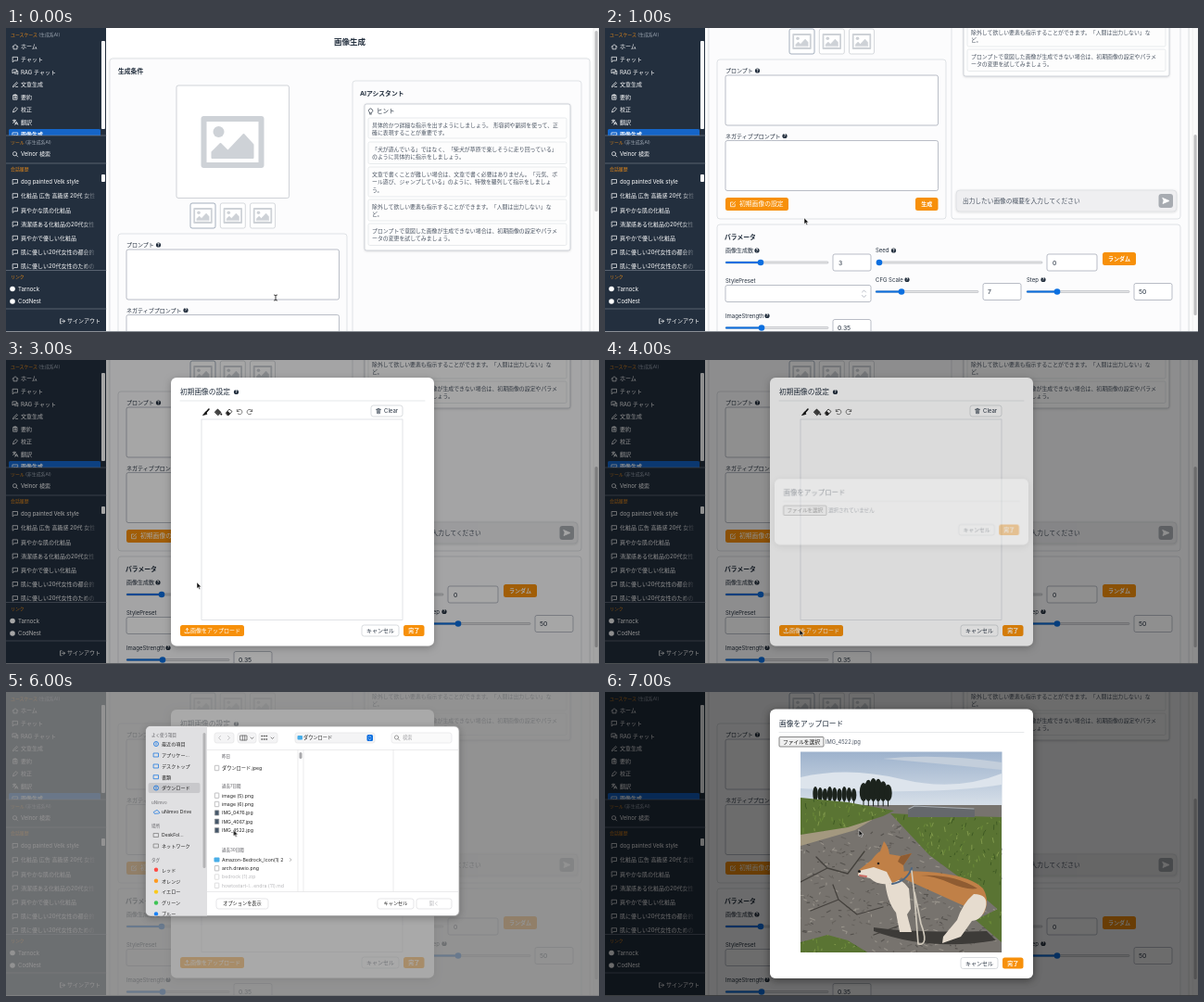
Recreate the animation shown at these times as an HTML page. Size 640 by 328 pixels, loop 8000 ms.

```html
<!DOCTYPE html>
<html lang="ja">
<head>
<meta charset="utf-8">
<title>画像生成</title>
<style>
html, body { margin: 0; width: 100%; height: 100%; overflow: hidden; background: #fff; }
svg { display: block; width: 640px; height: 328px; font-family: Inter, "Noto Sans CJK JP", "Noto Sans CJK", sans-serif; }
text { white-space: pre; }
.anim { animation: 8s step-end infinite; }
.page { animation-name: page; }
.thumb { animation-name: thumb; }
.hover { animation-name: hover; }
.modal { animation-name: modal; }
.dim { animation-name: dim; }
.upload { animation-name: upload; transform-origin: 320px 163.5px; }
.sheet { animation-name: sheet; }
.preview { animation-name: preview; }
.cursor { animation-name: cursor; }
.beam { animation-name: beam; }
.hand { animation-name: hover; }
.arrow { animation-name: arrow; }
@keyframes page { 0% { transform: none } 12.5%, 100% { transform: translateY(-188px) } }
@keyframes thumb { 0% { transform: none } 12.5%, 100% { transform: translateY(112px) } }
@keyframes hover { 0% { opacity: 0 } 25% { opacity: 1 } 37.5%, 100% { opacity: 0 } }
@keyframes modal { 0% { opacity: 0 } 37.5%, 100% { opacity: 1 } }
@keyframes dim { 0% { opacity: 0 } 50% { opacity: .4 } 62.5%, 100% { opacity: 1 } }
@keyframes upload {
  0% { opacity: 0; transform: scale(.965) }
  50% { opacity: .35; transform: scale(.965) }
  62.5% { opacity: 1; transform: none }
  87.5%, 100% { opacity: 0; transform: none }
}
@keyframes sheet { 0% { opacity: 0 } 75% { opacity: 1 } 87.5%, 100% { opacity: 0 } }
@keyframes preview { 0% { opacity: 0 } 87.5%, 100% { opacity: 1 } }
@keyframes cursor {
  0% { transform: translate(291px, 291px) }
  12.5% { transform: translate(215px, 205px) }
  25% { transform: translate(152px, 188px) }
  37.5% { transform: translate(206px, 240px) }
  50% { transform: translate(210px, 291px) }
  62.5% { transform: translate(226px, 164px) }
  75% { transform: translate(245.5px, 149px) }
  87.5%, 100% { transform: translate(274px, 149px) }
}
@keyframes beam { 0% { opacity: 1 } 12.5%, 100% { opacity: 0 } }
@keyframes arrow { 0% { opacity: 0 } 12.5% { opacity: 1 } 25% { opacity: 0 } 37.5%, 100% { opacity: 1 } }
</style>
</head>
<body>
<svg id="stage" viewBox="0 0 640 328"></svg>
<script>
const INK = '#232f3e', ORANGE = '#f7900a', LINE = '#c9cdd2', BLUE = '#0b6fe0';

// Text is placed by its vertical centre.
const t = (x, cy, s, { size = 6, fill = INK, weight = 400, anchor = 'start' } = {}) =>
  `<text x="${x}" y="${cy + size * .36}" font-size="${size}" fill="${fill}" font-weight="${weight}" text-anchor="${anchor}">${s}</text>`;
const box = (x, y, w, h, fill = '#fff', stroke = 'none', r = 2, extra = '') =>
  `<rect x="${x}" y="${y}" width="${w}" height="${h}" rx="${r}" fill="${fill}" stroke="${stroke}" stroke-width=".7" ${extra}/>`;
const path = (d, stroke, w = .7, fill = 'none') =>
  `<path d="${d}" fill="${fill}" stroke="${stroke}" stroke-width="${w}" stroke-linecap="round" stroke-linejoin="round"/>`;
const shape = (d, fill) => `<path d="${d}" fill="${fill}"/>`;
const dot = (x, y, r, fill) => `<circle cx="${x}" cy="${y}" r="${r}" fill="${fill}"/>`;
const at = (x, y, s) => `<g transform="translate(${x} ${y})">${s}</g>`;
const anim = (name, s) => `<g class="anim ${name}">${s}</g>`;
const clipped = (id, s) => `<g clip-path="url(#${id})">${s}</g>`;
const btn = (x, y, w, h, label, fill = ORANGE, ink = '#fff', stroke = 'none') =>
  box(x, y, w, h, fill, stroke, 2.5) +
  t(x + w / 2, y + h / 2, label, { fill: ink, weight: ink === '#fff' ? 600 : 400, anchor: 'middle' });
const help = (x, y) => dot(x, y, 2.6, INK) + t(x, y, '?', { size: 4.4, fill: '#fff', weight: 700, anchor: 'middle' });

// Icons live in a 6 x 6 box.
const ICONS = {
  home: 'M0 3L3 .5 6 3M1 2.5V5.5H5V2.5',
  chat: 'M.5 .5H5.5V4.3H2L.5 5.7Z',
  chats: 'M.3 .5H4.3V3.3H1.5L.3 4.3ZM4.5 2H5.8V5.7L4.8 4.8H2.2V3.5',
  pen: 'M.5 5.5L1 4 4.5 .5 5.5 1.5 2 5ZM3.5 5.5H5.7',
  clip: 'M1 1H5V5.7H1ZM2 .4H4V1.5H2ZM2 3H4M2 4.3H4',
  nib: 'M.5 5.5L1.5 2.5 4 .5 5.5 2 3.5 4.5Z',
  lang: 'M.3 1.2H3.7M2 .3V1.2M3.2 1.2L.5 4M1 2L3 3.8M2.8 5.7L4.3 2.5 5.8 5.7M3.3 4.6H5.3',
  image: 'M.3 .8H5.7V5.3H.3ZM.5 4.8L2.3 2.8 3.5 4 4.5 3 5.6 4.3',
  search: 'M4.2 4.2L5.7 5.7M4.6 2.5A2.1 2.1 0 1 1 .4 2.5A2.1 2.1 0 1 1 4.6 2.5',
  exit: 'M2 .5H.5V5.5H2M2 3H5.5M4 1.5L5.5 3 4 4.5',
  edit: 'M3 1H.5V5.7H5.2V3M2.2 4L5.5 .5',
  up: 'M3 4V.5M1.5 2L3 .5 4.5 2M.5 4.5V5.5H5.5V4.5',
  trash: 'M.5 1.3H5.5M2 1.2V.4H4V1.2M1.2 1.5L1.5 5.7H4.5L4.8 1.5M2.5 2.5V4.7M3.5 2.5V4.7',
  bulb: 'M2 4.2A2.2 2.2 0 1 1 4 4.2V5H2ZM2.2 6H3.8',
  undo: 'M.3 .5V2.5H2.3M.5 2.4A2.7 2.7 0 1 1 1.3 5',
  redo: 'M5.7 .5V2.5H3.7M5.5 2.4A2.7 2.7 0 1 0 4.7 5'
};
const icon = (name, cx, cy, color = '#fff', w = .7) => at(cx - 3, cy - 3, path(ICONS[name], color, w));

const picture = (cx, cy, k) => `<g transform="translate(${cx} ${cy}) scale(${k})">` +
  path('M-31 -25H31V25H-31Z', '#ced2d7', 6) + dot(-15, -11, 6, '#ced2d7') +
  path('M-22 17V11L-13 2 -5 10 12 -8 22 3V17Z', '#ced2d7', 2, '#ced2d7') + '</g>';

const slider = (x0, x1, x, y) =>
  box(x0, y - 1, x1 - x0, 2, '#e6e6e8', '#b9bcc0', 1) + box(x0, y - 1, x - x0, 2, BLUE, 'none', 1) + dot(x, y, 3.3, BLUE);
const field = (x, y, w, value, dx = 6) => box(x, y, w, 18, '#fff', '#9ca3af') + t(x + dx, y + 9.2, value, { size: 6.8 });

function sidebar() {
  const head = (y, a, b = '') => t(5, y, `${a}<tspan fill="#9aa3af"> ${b}</tspan>`, { size: 4.9, fill: '#dd8419' });
  const item = (ic, y, s, weight = 400) => icon(ic, 10, y) + t(16, y, s, { fill: '#fff', weight });
  const cases = [['home', 'ホーム'], ['chat', 'チャット'], ['chats', 'RAG チャット'], ['pen', '文章生成'],
    ['clip', '要約'], ['nib', '校正'], ['lang', '翻訳'], ['image', '画像生成']];
  const chats = ['dog painted Velk style', '化粧品 広告 高級感 20代 女性', '爽やかな肌の化粧品', '清潔感ある化粧品の20代女性',
    '爽やかで優しい化粧品', '肌に優しい20代女性の都会的', '肌に優しい20代女性のための'];
  return box(0, 0, 108, 328, INK, 'none', 0) +
    head(7, 'ユースケース', '(生成系AI)') +
    clipped('cases', box(3, 109, 99, 14, '#1565c8', 'none', 1.5) +
      cases.map(([ic, s], i) => item(ic, 20.3 + i * 13.55, s, i === 7 ? 700 : 400)).join('')) +
    box(103, 14, 4, 95, '#fff', 'none', 1) +
    head(123, 'ツール', '(非生成系AI)') + item('search', 136.2, 'Velnor 検索') +
    head(152.5, '会話履歴') +
    clipped('chats', chats.map((s, i) => item('chat', 166 + i * 15.2, s)).join('') +
      '<rect x="82" y="158" width="26" height="104" fill="url(#fade)"/>') +
    box(103, 158, 4, 8, '#fff', 'none', 1) +
    head(267.8, 'リンク') + dot(7, 281.5, 2.8, '#fff') + t(13, 281.5, 'Tarnock', { fill: '#fff' }) +
    dot(7, 295, 2.8, '#fff') + t(13, 295, 'CodNest', { fill: '#fff' }) +
    icon('exit', 61, 316.3) + t(66, 316.3, 'サインアウト', { fill: '#fff' }) +
    [116, 146, 261.5, 303].map(y => path(`M0 ${y}H108`, '#7c8592', .6)).join('');
}

function hints() {
  const list = [
    [97, 22, '具体的かつ詳細な指示を出すようにしましょう。 形容詞や副詞を使って、正', '確に表現することが重要です。'],
    [123, 23.5, '「犬が遊んでいる」ではなく、「柴犬が草原で楽しそうに走り回っている」', 'のように具体的に指示をしましょう。'],
    [150, 32, '文章で書くことが難しい場合は、文章で書く必要はありません。「元気、ボ', 'ール遊び、ジャンプしている」のように、特徴を羅列して指示をしましょ', 'う。'],
    [185, 23, '除外して欲しい要素も指示することができます。「人間は出力しない」な', 'ど。'],
    [211, 23.5, 'プロンプトで意図した画像が生成できない場合は、初期画像の設定やパラメ', 'ータの変更を試してみましょう。']];
  return box(387, 82, 222, 158, '#fff', '#b8bec6', 2, 'filter="url(#soft)"') +
    icon('bulb', 393.5, 90, INK) + t(400, 90, 'ヒント', { size: 6.5 }) +
    list.map(([y, h, ...lines]) => box(391, y, 214, h, '#fdfdfd', '#dfe2e6', 1.5) +
      lines.map((s, i) => t(395, y + 7.5 + i * 8.6, s, { size: 5.9, fill: '#4b5563' })).join('')).join('');
}

function page() {
  const bold = { size: 6.8, weight: 700 };
  const card = (x, y, w, h) => box(x, y, w, h, '#fcfcfd', '#d3d7dc', 3);
  const init = fill => btn(130, 371, 68, 14, '', fill) + icon('edit', 138, 378) +
    t(145, 378, '初期画像の設定', { size: 6.8, fill: '#fff' });
  return t(371, 15, '画像生成', { size: 8.5, weight: 600, anchor: 'middle' }) +
    box(112, 33, 518, 520, '#fcfcfd', '#d3d7dc', 3, 'filter="url(#soft)"') + t(121, 46.5, '生成条件', bold) +
    box(184, 62, 121.5, 121.5, '#fff', '#bcc1c8') + picture(244.5, 123, 1) +
    [199, 231.3, 263.5].map((x, i) => box(x, 189, 27, 27, '#fff', i ? '#c4c9cf' : '#7f8fa3') + picture(x + 13.5, 202.5, .3)).join('') +
    card(121, 222, 247, 172) +
    t(130, 234, 'プロンプト') + help(164.5, 234) + box(130, 239, 229.5, 54, '#fff', '#9ca3af') +
    t(130, 304.5, 'ネガティブプロンプト') + help(194, 304.5) + box(130, 309.5, 229.5, 54, '#fff', '#9ca3af') +
    init(ORANGE) + anim('hover', init('#b9691a')) + btn(335, 371, 24.5, 14, '生成') +
    card(374, 57, 247, 337) + t(382, 71, 'AIアシスタント', bold) + hints() +
    box(379, 363, 238, 23, '#efeff1', '#d9dbdf', 4, 'filter="url(#soft)"') +
    t(386, 374.5, '出力したい画像の概要を入力してください', { size: 6.7, fill: '#4b5563' }) +
    box(597.5, 367, 15.5, 15, '#a7abb1', 'none', 3) + path('M602 371.5L609 374.5 602 377.5 603 374.5Z', '#fff', .8, '#fff') +
    card(121, 400, 500, 140) + t(129, 413.5, 'パラメータ', bold) +
    t(130, 428, '画像生成数') + help(164, 428) + slider(130, 241, 168, 441) + field(246, 432, 41, '3') +
    t(292, 428, 'Seed') + help(311.5, 428) + slider(293, 472, 296, 441) + field(477, 432, 54, '0') +
    btn(537, 430, 36, 14, 'ランダム') +
    t(130, 460.5, 'StylePreset') + box(130, 465.5, 157, 18, '#fff', '#9ca3af') +
    path('M277.5 473L279.5 471 281.5 473M277.5 476.5L279.5 478.5 281.5 476.5', '#9ca3af') +
    t(292, 459.5, 'CFG Scale') + help(326, 459.5) + slider(292, 403, 320, 472.5) + field(408, 463.5, 41, '7', 5) +
    t(455, 459.5, 'Step') + help(473, 459.5) + slider(455, 566, 488, 472.5) + field(571, 463.5, 41, '50', 5) +
    t(130, 498.5, 'ImageStrength') + help(175, 498.5) + slider(130, 241, 169, 511.5) + field(246, 502.5, 41, '0.35', 5);
}

const panel = (y, h) => box(178, y, 284, h, '#fff', 'none', 6, 'filter="url(#lift)"');
const footer = y => btn(384, y, 40, 12, 'キャンセル', '#fff', INK, LINE) + btn(429, y, 22.5, 12, '完了');
const rule = y => path(`M188 ${y}H452`, '#d5d8dc', .6);

function settings() {
  return panel(19, 289.5) + t(188, 34.5, '初期画像の設定', { size: 7.7 }) + help(248.5, 34.5) + rule(44) +
    path('M219 53L215.5 57', '#111', 1.6) + path('M215.5 56L212.5 59.5 216.5 58.5Z', '#111', .8, '#111') +
    path('M225.5 56L228.5 53 232 56.5 229 59.5Z', '#111', .8, '#444') + dot(232.3, 58.5, 1, '#111') +
    path('M237.5 57L241 53 244 55.5 240.5 59.5H239Z', '#222', .8) + shape('M237.5 57L239.2 55 242 57.6 240.5 59.5H239Z', '#222') +
    icon('undo', 252, 56, '#444') + icon('redo', 263, 56, '#444') +
    btn(394, 49, 34, 12, '', '#fff', INK, LINE) + icon('trash', 402, 55, INK, .6) + t(408, 55, 'Clear') +
    box(211, 64, 217, 216.5, '#fff', '#d5d8dc', 0) +
    btn(188, 286, 69, 12, '') + icon('up', 195.5, 292) + t(199, 292, '画像をアップロード', { fill: '#fff', weight: 500 }) + footer(286);
}

// Title and file row shared by the upload dialog's two sizes.
const uploadHead = (y, file) => t(188, y + 15.5, '画像をアップロード', { size: 7.7 }) + rule(y + 25) +
  box(188, y + 30, 48, 10.5, '#efefef', '#555', 1) + t(212, y + 35.2, 'ファイルを選択', { size: 5.7, fill: '#111', anchor: 'middle' }) +
  t(238, y + 35.2, file, { size: 5.8, fill: '#4b5563' });

let seed = 7;
const rnd = (a, b) => a + (b - a) * ((seed = seed * 16807 % 2147483647) / 2147483647);
// Short random strokes over an area, for grass and gravel.
const scatter = (n, [x0, y0, x1, y1], dx, dy, colors, w) => colors.map(c => path(Array.from({ length: n }, () =>
  `M${rnd(x0, x1).toFixed(1)} ${rnd(y0, y1).toFixed(1)}l${rnd(-dx, dx).toFixed(1)} ${rnd(-dy, dy).toFixed(1)}`).join(''), c, w)).join('');

const GRASS = 'M211 114L262 119 312 128 300 134 262 146 211 154ZM308 131L350 133 428 135V238L392 207 350 176ZM211 270L240 262 262 268 285 282H211ZM400 246L428 232V270Z';

function photo() {
  const fur = '#c08047', pale = '#e6dccf', dark = '#8f5c32';
  const tree = (x, top, r) => `<ellipse cx="${x}" cy="${(top + 118) / 2}" rx="${r}" ry="${(118 - top) / 2}" fill="#1c231d"/>` + path(`M${x} 116V123`, '#1c231d', 1);
  const row = Array.from({ length: 9 }, (_, i) => tree(227 + i * 5.2, 102 + i % 3, 2.7)).join('');
  const grove = Array.from({ length: 6 }, (_, i) => tree(279 + i * 5.3, 98 - Math.sin(i * .7) * 5, 4.2)).join('');
  return clipped('photo', '<rect x="211" y="64" width="218" height="218" fill="url(#sky)"/>' +
    shape('M211 92Q262 80 320 94T428 88V100Q350 112 211 104Z', '#dde4ec') + shape('M300 72Q360 66 428 76V84Q370 78 300 72Z', '#c3cedb') +
    shape('M211 122H428V282H211Z', '#77736e') +
    scatter(170, [211, 140, 428, 282], 5, 2, ['#55524e', '#98938b', '#67635e'], 1.1) +
    path('M211 205L240 190 262 196 280 172M240 190L228 178M222 236L252 224 272 240 300 232M252 224L246 208M290 262L318 252 348 270 402 262', '#44413d', 1.3) +
    shape('M211 152L262 144 295 134 270 149 211 166Z', '#a3987f') +
    row + grove +
    shape(GRASS, '#5a7433') +
    clipped('grass', scatter(230, [211, 114, 428, 282], 1.5, 5, ['#3f5a24', '#80994b', '#6b8a38'], 1)) +
    shape('M327 126L334 122 399 126V135H327Z', '#65686c') + path('M328 126L334 123 398 126', '#a9adb1', 1.2) +
    shape('M290 254Q330 260 412 258L422 268Q350 280 290 258Z', '#3d3b38') +
    shape('M306 194Q340 192 366 196 396 200 408 212 416 226 408 240 398 246L387 262 366 271 363 264 376 249 340 240 328 246 326 262H314L317 238Q304 222 306 194Z', fur) +
    shape('M340 198Q376 196 402 212 390 214 372 206T340 198Z', dark) +
    shape('M302 202Q318 198 328 212L330 234 326 240 331 259H318L314 238Q304 226 302 202Z', pale) +
    shape('M398 218Q414 218 411 232 407 246 396 247L384 264 364 271 365 264 380 246Q386 228 398 218Z', pale) +
    shape('M288 181Q293 174 297 172L301 161Q306 167 307 175L319 177 331 174 322 187Q325 202 310 206 294 208 286 200L273 197 274 192Z', fur) +
    shape('M319 177L331 174 322 187 316 183Z', dark) +
    shape('M274 193L290 189 304 194 310 206Q296 210 286 201L273 198Z', pale) +
    dot(274.5, 193.5, 1.6, '#222') + dot(295, 185, 1.3, '#222') + path('M275 198L282 199', '#c96a62', 1.8) +
    path('M310 207Q326 204 331 190', '#4c6784', 2) + path('M331 193L334 220 338 272Q350 274 341 250L334 216', '#d0c9bc', 1.7));
}

function fileSheet() {
  const small = { size: 4.5, fill: '#8a8a8e', weight: 600 };
  const side = [[56, '最近の項目'], [68, 'アプリケー…'], [80, 'デスクトップ'], [91.7, '書類'], [103.5, 'ダウンロード'],
    [129, 'uNimvo Drive'], [154.5, 'DeskFol…'], [166, 'ネットワーク']];
  const tags = [['レッド', '#ff4b45'], ['オレンジ', '#ff9a1f'], ['イエロー', '#fbc91b'], ['グリーン', '#3ec455'], ['ブルー', '#1a82f7']];
  const files = [[82, 'ダウンロード.jpeg'], [111.7, 'image (5).png'], [121, 'image (6).png'], [130.4, 'IMG_0476.jpg'], [139.8, 'IMG_4067.jpg'],
    [149.2, 'IMG_4522.jpg'], [181, 'Amazon-Bedrock_Icon(1) 2'], [190.2, 'arch.drawio.png'], [199.5, 'bedrock (1).zip'], [208.8, 'howtostart-l...endra (11).md']];
  const sideIcon = (y, i) => i === 5 ? path(`M160 ${y + 2}Q158 ${y} 161 ${y - .5}Q163 ${y - 3} 165 ${y}Q167 ${y + 2} 165 ${y + 2}Z`, BLUE)
    : i > 5 ? path(`M159.5 ${y - 2}H164.5V${y + 2}H159.5Z`, '#777')
    : i === 0 || i === 4 ? `<circle cx="162" cy="${y}" r="2.5" fill="none" stroke="${BLUE}" stroke-width=".8"/>` + path(`M162 ${y - 1.2}V${y + 1}`, BLUE)
    : path(`M159.5 ${y - 2}H164.5V${y + 2}H159.5Z`, BLUE);
  const fileIcon = (y, i) => i === 6 ? box(224.5, y - 2.5, 6, 5, '#49aee8', 'none', 1)
    : box(225.3, y - 2.7, 4.5, 5.4, i > 2 && i < 6 ? '#46586a' : '#fff', i > 7 ? '#d0d0d2' : '#a5a5a8', .4);
  const chip = (x, w, s) => box(x, 44, w, 11, '#f4f4f5', '#e4e4e6', 2.5) + s;
  return box(0, 0, 640, 328, 'rgba(172,172,172,.6)', 'none', 0) + box(151, 37, 338, 204.5, '#fff', '#9b9b9d', 5, 'filter="url(#lift)"') +
    clipped('sheet', box(151, 37, 66, 205, '#e0e0e2', 'none', 0) +
    [[46, 'よく使う項目'], [119, 'uNimvo'], [144, '場所'], [181.5, 'タグ']].map(([y, s]) => t(157, y, s, small)).join('') +
    box(153.5, 98, 56, 11, '#c8c8cb', 'none', 2) + box(212.5, 44, 3, 146, '#b4b4b6', 'none', 1.5) +
    side.map(([y, s], i) => sideIcon(y, i) + t(168, y, s, { size: 5.1, fill: '#222' })).join('') +
    tags.map(([s, c], i) => dot(162, 191.8 + i * 11.9, 2.2, c) + t(168, 191.8 + i * 11.9, s, { size: 5.1, fill: '#222' })).join('') +
    chip(225, 21, path('M231.5 47.5L229.5 49.5 231.5 51.5M239.5 47.5L241.5 49.5 239.5 51.5', '#b5b5b8', .8)) +
    chip(250, 20, path('M253 47H260V52H253ZM255.3 47V52M257.7 47V52M264 49L265.5 50.5 267 49', '#555')) +
    chip(273, 20, path('M276 47.5H276.5M278.5 47.5H279M281 47.5H281.5M276 51H276.5M278.5 51H279M281 51H281.5', '#555', 1.5) + path('M286 49L287.5 50.5 289 49', '#555')) +
    chip(312, 86, box(314.5, 47, 5.5, 4.5, '#49aee8', 'none', 1) + t(321, 49.5, 'ダウンロード', { size: 5.2, fill: '#222' }) +
      box(389.5, 46, 6.5, 7, BLUE, 'none', 1.5) + path('M391.5 48.7L392.7 47.5 393.9 48.7M391.5 50.5L392.7 51.7 393.9 50.5', '#fff', .6)) +
    box(416, 44, 65, 11, '#fafafa', '#e6e6e8', 2.5) + icon('search', 422, 49.5, '#777') + t(428, 49.5, '検索', { size: 5.2, fill: '#a5a5a8' }) +
    path('M217 62.5H489M217 215.5H489M321 62.5V215M418 62.5V215M315 62.5V215', '#dededf', .6) + box(316.5, 65, 3, 7, '#a9a9ac', 'none', 1.5) +
    [[69.5, '昨日'], [101.5, '過去7日間'], [170.8, '過去30日間']].map(([y, s]) => t(233, y, s, small)).join('') +
    files.map(([y, s], i) => fileIcon(y, i) + t(233, y, s, { size: 5.2, fill: i > 7 ? '#b8b8bb' : '#222' })).join('') +
    path('M306.5 179.5L308 181 306.5 182.5', '#888', .6) +
    [[227, 56, 'オプションを表示', '#222'], [401, 39, 'キャンセル', '#222'], [443, 38, '開く', '#b8b8bb']].map(([x, w, s, c]) =>
      box(x, 223, w, 11, '#fff', '#dcdcde', 2.5) + t(x + w / 2, 228.5, s, { size: 5.2, fill: c, anchor: 'middle' })).join(''));
}

const clip = (id, x, y, w, h, r = 0) => `<clipPath id="${id}">${box(x, y, w, h, '#fff', 'none', r)}</clipPath>`;
const shadow = (id, dy, blur, a) =>
  `<filter id="${id}" x="-20%" y="-20%" width="140%" height="140%"><feDropShadow dx="0" dy="${dy}" stdDeviation="${blur}" flood-opacity="${a}"/></filter>`;
const shade = box(0, 0, 640, 328, 'rgba(0,0,0,.35)', 'none', 0);

document.getElementById('stage').innerHTML = '<defs>' +
  clip('cases', 0, 13, 108, 103) + clip('chats', 0, 158, 108, 103) + clip('main', 108, 0, 532, 328) +
  clip('photo', 211, 64.5, 217.5, 216.5) + clip('sheet', 151, 37, 338, 204.5, 5) +
  `<clipPath id="grass">${shape(GRASS, '#fff')}</clipPath>` +
  shadow('soft', .6, 1, .15) + shadow('lift', 2, 4, .25) +
  `<linearGradient id="fade"><stop stop-color="${INK}" stop-opacity="0"/><stop offset=".65" stop-color="${INK}"/></linearGradient>` +
  '<linearGradient id="sky" x2="0" y2="1"><stop stop-color="#9db2cc"/><stop offset=".28" stop-color="#d9e1ea"/></linearGradient></defs>' +
  box(0, 0, 640, 328, '#fff', 'none', 0) +
  clipped('main', anim('page', page())) +
  box(634, 0, 6, 328, '#fafafa', '#e8e8e8', 0) + anim('thumb', box(635.5, 3, 3.2, 195, '#bfbfc1', 'none', 1.6)) +
  sidebar() + box(0, 327, 640, 1, '#8a8f96', 'none', 0) +
  anim('modal', shade + settings()) + anim('dim', shade) +
  anim('upload', panel(127, 73.5) + uploadHead(127, '選択されていません') + footer(178)) +
  anim('sheet', fileSheet()) +
  anim('preview', panel(18.5, 290.5) + uploadHead(18.5, 'IMG_4522.jpg') + photo() + footer(286.5)) +
  anim('cursor',
    anim('beam', path('M-1.5 -3Q0 -3 0 -2 0 -3 1.5 -3M0 -2V2M-1.5 3Q0 3 0 2 0 3 1.5 3', '#111', .8)) +
    anim('hand', path('M-1 0Q0 -1 .8 0V2.5L3.5 3.3Q4.3 4 3.5 7H-.5L-3 4Q-2.5 3 -1 4Z', '#222', .6, '#fff')) +
    anim('arrow', path('M0 0V6.5L1.5 5.2 2.6 7.6 3.7 7.1 2.6 4.8H4.7Z', '#fff', .5, '#111')));
</script>
</body>
</html>
```
